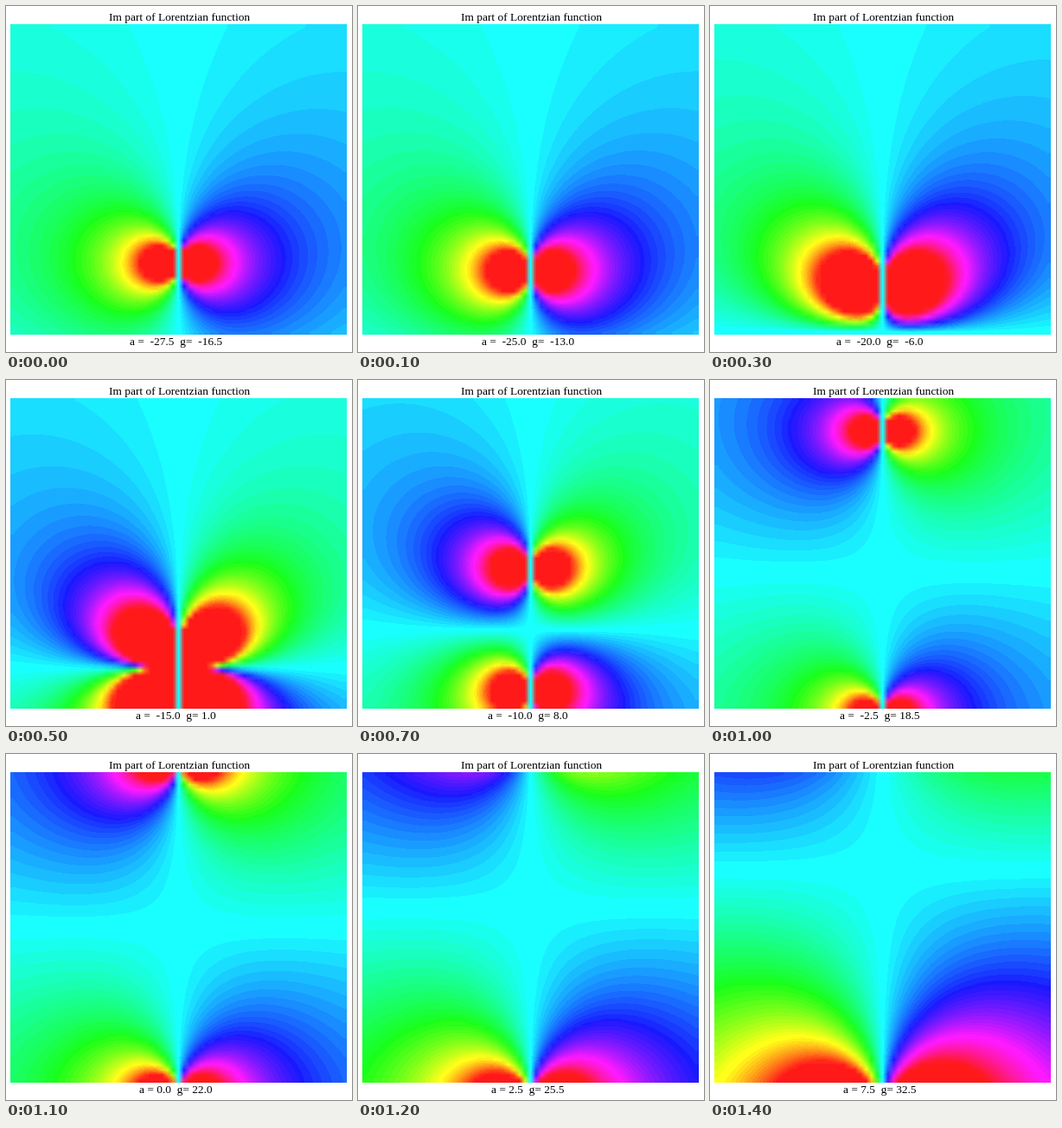
These frames come from a looping animation (400 by 400 pixels, 1.5 s). A matplotlib script:

```python
import numpy as np
import matplotlib.pyplot as plt
from matplotlib.animation import FuncAnimation
from matplotlib.colors import hsv_to_rgb

SIZE, DPI = 400, 100
LEFT, TOP, WIDTH, HEIGHT = 5, 21, 389, 359
FRAMES, INTERVAL = 15, 100
GRID, REACH = 61, 20
LOW = 0.1


def blend_weights(pixels):
    """Linear weights that spread the grid samples over a row of pixels."""
    pos = (np.arange(pixels) + 0.5) / pixels * GRID - 0.5
    pos = np.clip(pos, 0, GRID - 1)
    return np.maximum(0, 1 - np.abs(pos[:, None] - np.arange(GRID)))


axis = np.linspace(-REACH, REACH, GRID)
X, Y = np.meshgrid(axis, axis[::-1])
ACROSS, DOWN = blend_weights(WIDTH), blend_weights(HEIGHT)


def lorentz_im(a, g):
    """Im of g / ((z - ia)^2 + g^2), split into its two poles."""
    def pole(p):
        return X / (X**2 + (Y - p)**2 + 1e-9)
    return 0.5 * (pole(a - g) - pole(a + g))


def to_hue(f):
    """Scale to 0..1 between the outer outlier fences."""
    q1, q3 = np.percentile(f, [25, 75])
    low, high = q1 - 3 * (q3 - q1), q3 + 3 * (q3 - q1)
    return np.clip((f - low) / (high - low), 0, 1)


def posterize(rgb):
    """Sixteen levels per channel, with the darkest used one kept at LOW."""
    level = np.floor(rgb * 255 / 16)
    return np.clip(LOW + (1 - LOW) * (level - 1) / 14, 0, 1)


def density(a, g):
    hue = to_hue(lorentz_im(a, g))
    sat = np.full_like(hue, 1 - LOW)
    rgb = hsv_to_rgb(np.dstack([hue, sat, np.ones_like(hue)]))
    rgb = np.stack([DOWN @ rgb[..., c] @ ACROSS.T for c in range(3)], axis=-1)
    return posterize(rgb + 1e-6)


def params(i):
    return -27.5 + 2.5 * i, -16.5 + 3.5 * i


def number(v):
    return f"  {v:.1f}" if v < 0 else f" {v:.1f}"


def caption(a, g):
    return f"a ={number(a)}  g={number(g)}"


fig = plt.figure(figsize=(SIZE / DPI, SIZE / DPI), dpi=DPI, facecolor="white")
ax = fig.add_axes([LEFT / SIZE, 1 - (TOP + HEIGHT) / SIZE,
                   WIDTH / SIZE, HEIGHT / SIZE])
ax.axis("off")
image = ax.imshow(density(*params(0)), interpolation="nearest", aspect="auto")


def label(x, baseline, text):
    return fig.text(x / SIZE, 1 - baseline / SIZE, text, ha="center",
                    va="baseline", family="Liberation Serif", fontsize=9.6,
                    color="black")


label(201, 17, "Im part of Lorentzian function")
values = label(196.5, 392, caption(*params(0)))


def update(i):
    a, g = params(i)
    image.set_data(density(a, g))
    values.set_text(caption(a, g))
    return image, values


anim = FuncAnimation(fig, update, frames=FRAMES, interval=INTERVAL,
                     repeat=True, repeat_delay=0, blit=False)
plt.show()
```
